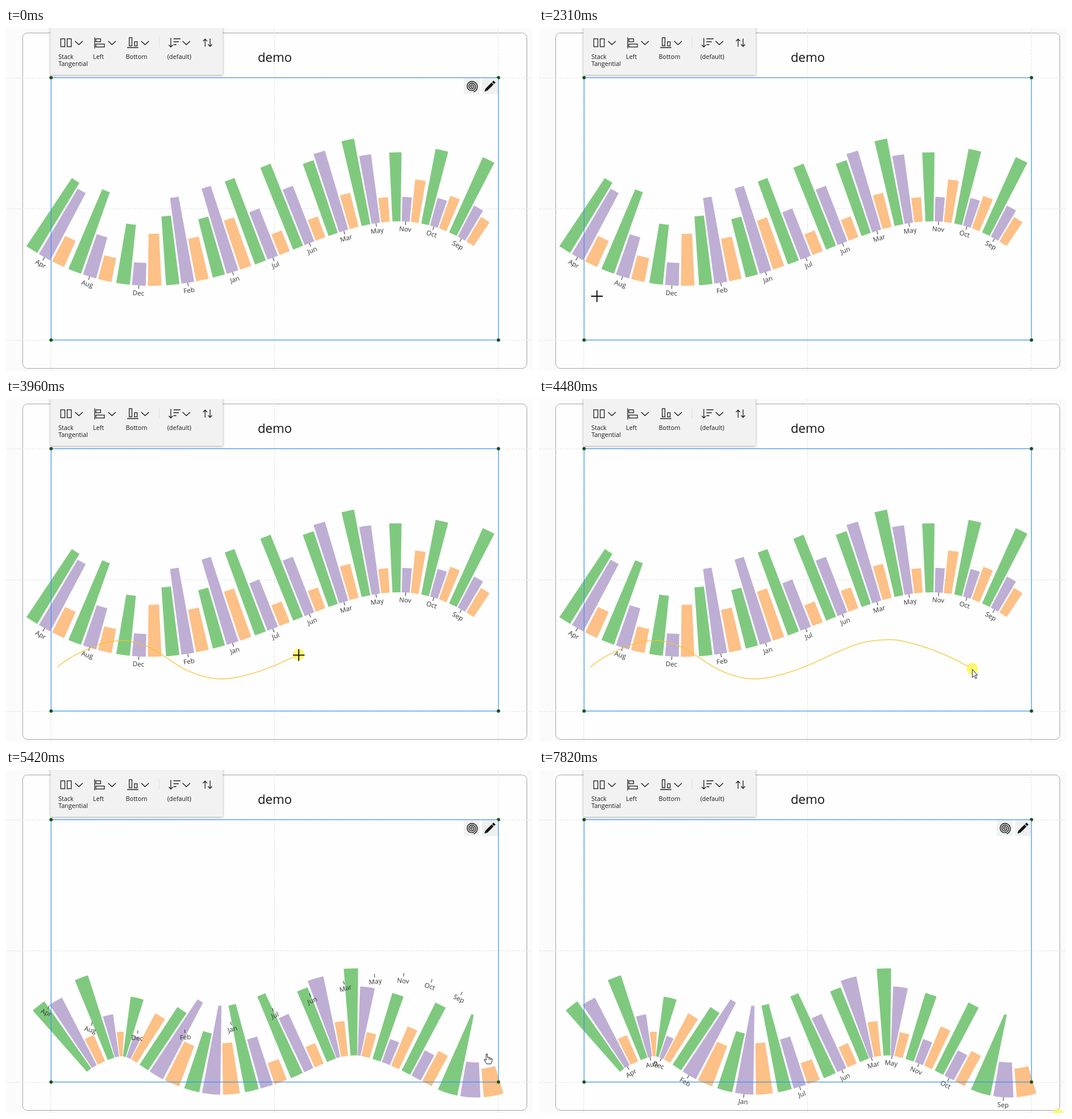
Write an HTML page with a canvas that moves like this. It is 900 px wide and 587 px high and loops after 7900 ms.

```html
<!DOCTYPE html>
<html lang="en">
<head>
<meta charset="utf-8">
<title>Curve chart demo</title>
<style>
html, body { margin: 0; width: 100%; height: 100%; overflow: hidden; background: #fbfbfb; }
canvas { display: block; }
</style>
</head>
<body>
<canvas width="900" height="587"></canvas>
<script>
const c = document.querySelector('canvas').getContext('2d');
const LOOP = 7900, HOLD = 77, DRAW = 2940, RELEASE = 5370, REDRAW = 5420;
const FONT = '"Open Sans", "Noto Sans", sans-serif';
const COLORS = ['#7fc97f', '#beaed4', '#fdc086'];
const MONTHS = {
  Apr: [140, 130, 49], Aug: [148, 73, 42], Dec: [103, 39, 89], Feb: [118, 148, 74],
  Jan: [103, 152, 88], Jul: [151, 87, 38], Jun: [151, 102, 38], Mar: [131, 141, 60],
  May: [149, 118, 42], Nov: [118, 42, 73], Oct: [130, 49, 59], Sep: [141, 60, 49] };

// Layout along a curve, as shares of its length, and the base's depth below it
const PITCH = .084, BAR_STEP = .0265, BAR_WIDTH = .023, DEPTH = 76.5, SAMPLES = 3000;

// Heading in degrees of the pen at distances along its stroke
const TURNS = [
  [0, -41.5], [40, -27], [80, -20], [118, -2.7], [142, 13.2], [184, 31.6], [209, 34.3],
  [222, 33.5], [285, 12], [318, -5.8], [342, -13.8], [363, -16.7], [420, -25.5],
  [484, -22], [506, -11.5], [550, 0], [574, 13], [675, 27.7], [726, 28.5], [793, -17]];
const PEN_X = [[DRAW, 88], [3400, 273], [3710, 397], [4480, 740], [5290, 823]];

// Free pointer moves: start, end, from, to
const MOVES = [
  [70, 690, [861, 538], [827, 98]],
  [1310, 2080, [828, 98], [104, 458]],
  [2160, 2310, [122, 457], [99, 459]],
  [2540, 2770, [97, 460], [88, 460]],
  [RELEASE, RELEASE + 1, [822, 486], [822, 486]],
  [6440, 6670, [790, 420], [563, 8]],
  [7130, 7360, [834, 95], [864, 547]],
  [7820, 7821, [886, 591], [886, 591]]];

const within = (t, a, b) => t >= a && t < b;
const clamp = p => Math.max(0, Math.min(1, p));
const mix = (a, b, p) => a + (b - a) * p;
const smooth = p => { p = clamp(p); return p * p * (3 - 2 * p); };
const held = t => Math.floor((t + 8) / HOLD) * HOLD;
const rad = d => d * Math.PI / 180;

function along(keys, v) {
  const i = Math.max(1, keys.findIndex(k => k[0] >= v) >>> 0);
  const j = Math.min(i, keys.length - 1);
  const [a, b] = [keys[j - 1], keys[j]];
  return mix(a[1], b[1], clamp((v - a[0]) / (b[0] - a[0])));
}

function measure(points) {
  let s = 0;
  return points.map(([x, y], i) => {
    if (i) s += Math.hypot(x - points[i - 1][0], y - points[i - 1][1]);
    return { x, y, s };
  });
}

// Bezier through (-1,0) (-.25,-.5) (.25,.5) (1,0), scaled to the plot
function waveCurve() {
  return measure(Array.from({ length: SAMPLES }, (_, i) => {
    const t = i / (SAMPLES - 1), r = 1 - t;
    const x = t ** 3 - r ** 3 + .75 * t * r * (t - r);
    return [459 + 382 * x, 309.5 + 382 * 1.5 * t * r * (r - t)];
  }));
}

function penCurve() {
  const step = 793 / SAMPLES;
  let x = 87.3, y = 459.5;
  return measure(Array.from({ length: SAMPLES }, (_, i) => {
    const a = rad(along(TURNS, i * step));
    return [x += step * Math.cos(a), y += step * Math.sin(a)];
  }));
}

// Place on the curve at share u, with the direction there
function spot(curve, u) {
  const s = clamp(u) * curve.at(-1).s;
  const i = Math.max(1, curve.findIndex(q => q.s >= s));
  const a = curve[i - 1], b = curve[i];
  return { x: b.x, y: b.y, angle: Math.atan2(b.y - a.y, b.x - a.x) };
}

function raise({ x, y, angle }, h) {
  return [x + Math.sin(angle) * (h - DEPTH), y - Math.cos(angle) * (h - DEPTH)];
}

function layout(curve) {
  const bars = [], marks = [];
  Object.values(MONTHS).forEach((heights, m) => {
    heights.forEach((h, k) => {
      const edge = Array.from({ length: 7 }, (_, j) =>
        spot(curve, m * PITCH + k * BAR_STEP + j / 6 * BAR_WIDTH));
      bars.push({
        color: COLORS[k],
        points: [...edge.map(e => raise(e, 0)), ...edge.reverse().map(e => raise(e, h))]
      });
    });
    const mid = spot(curve, m * PITCH + BAR_STEP + BAR_WIDTH / 2);
    marks.push([...raise(mid, 0), mid.angle]);
  });
  return { bars, marks };
}

const PEN = penCurve();
const BEFORE = layout(waveCurve()), AFTER = layout(PEN);

function pointer(t) {
  if (within(t, DRAW, RELEASE)) {
    const x = along(PEN_X, DRAW + held(t - DRAW));
    return [x, PEN.find(q => q.x >= x).y + 1];
  }
  const move = MOVES.filter(m => m[0] <= t).pop();
  if (!move) return [0, 0];
  const [start, end, from, to] = move;
  const p = smooth(held(t - start) / (end - start));
  return from.map((v, i) => mix(v, to[i], p));
}

function stroke(color, width, ...lines) {
  c.strokeStyle = color;
  c.lineWidth = width;
  c.beginPath();
  for (const line of lines)
    line.forEach(([x, y], i) => i ? c.lineTo(x, y) : c.moveTo(x, y));
  c.stroke();
}

function shape(points, fill, line) {
  c.beginPath();
  points.forEach(([x, y]) => c.lineTo(x, y));
  c.closePath();
  c.fillStyle = fill;
  c.fill();
  if (line) { c.strokeStyle = line; c.lineWidth = 1; c.stroke(); }
}

function disc(x, y, r, color) {
  c.fillStyle = color;
  c.beginPath();
  c.arc(x, y, r, 0, 7);
  c.fill();
}

function write(text, x, y, size, align = 'left', color = '#1a1a1a') {
  c.font = `${size}px ${FONT}`;
  c.textAlign = align;
  c.fillStyle = color;
  c.fillText(text, x, y);
}

function placed(x, y, angle, draw) {
  c.save();
  c.translate(x, y);
  c.rotate(angle);
  draw();
  c.restore();
}

function card(hover) {
  c.fillStyle = '#fbfbfb';
  c.fillRect(0, 0, 900, 587);
  c.beginPath();
  if (hover) c.roundRect(29, 9, 860, 573, 3);
  else c.roundRect(28.5, 8.5, 861, 574, 8);
  c.fillStyle = '#fefefe';
  c.fill();
  c.strokeStyle = hover ? '#3b8fe0' : '#a6a6a6';
  c.lineWidth = hover ? 2 : 1;
  c.stroke();
  c.setLineDash([2, 2]);
  stroke('#dcdcdc', 1,
    ...[85, 309, 534].map(y => [[0, y + .5], [900, y + .5]]),
    ...[77, 459, 841].map(x => [[x - .5, 0], [x - .5, 587]]));
  c.setLineDash([]);
  write('demo', 459, 57.5, 21.5, 'center', '#111');
}

function labels(p) {
  Object.keys(MONTHS).forEach((name, i) => {
    const [x, y, angle] = BEFORE.marks[i].map((v, j) => mix(v, AFTER.marks[i][j], p));
    placed(x, y, angle, () => {
      stroke('#333', 1, [[0, 0], [0, 6]]);
      write(name, 0, 17, 11.3, 'center', '#333');
    });
  });
}

function selection() {
  c.strokeStyle = '#2f8cf0';
  c.lineWidth = 1.1;
  c.strokeRect(77, 85, 764, 449);
  for (const x of [77, 841]) for (const y of [85, 534]) {
    disc(x, y, 3, '#3f7f4a');
    disc(x, y, 2.3, '#1f4a10');
  }
}

function toolbar() {
  c.save();
  c.shadowColor = 'rgba(0,0,0,.35)';
  c.shadowBlur = 4;
  c.shadowOffsetY = 1;
  c.fillStyle = '#f2f2f2';
  c.fillRect(76, -5, 294, 85);
  c.restore();
  for (const x of [124.5, 181, 237.5, 308])
    stroke('#222', 1.4, [[x - 6.5, 22.5], [x, 28.5], [x + 6.5, 22.5]]);
  c.lineWidth = 1.3;
  for (const r of [[93.5, 18.5, 7, 13.5], [104.5, 18.5, 7, 13.5], [153.5, 18.5, 8, 5],
    [153.5, 27.5, 14.5, 5], [210.5, 16.5, 4.5, 14], [219.5, 23.5, 4.5, 7]]) c.strokeRect(...r);
  stroke('#222', 1.3,
    [[151.5, 16], [151.5, 35]], [[207, 33.5], [226, 33.5]],
    [[281.5, 17], [281.5, 32.5]], [[278, 29], [281.5, 32.5], [285, 29]],
    [[286, 18.5], [298, 18.5]], [[286, 23.5], [295, 23.5]], [[286, 28.5], [291, 28.5]],
    [[340, 32], [340, 19]], [[336.5, 22.5], [340, 19], [343.5, 22.5]],
    [[348.5, 18], [348.5, 31.5]], [[345, 28], [348.5, 31.5], [352, 28]]);
  stroke('#dedede', 1, [[261.5, 15], [261.5, 33]]);
  write('Stack', 89.5, 53, 10.5);
  write('Tangential', 89.5, 64.5, 10.5);
  write('Left', 148.5, 53, 10.5);
  write('Bottom', 204.5, 53, 10.5);
  write('(default)', 275.5, 53, 10.5);
}

function buttons() {
  c.fillStyle = '#f0f0f0';
  c.fillRect(782, 86, 27, 27);
  c.fillRect(813, 86, 27, 27);
  const spiral = Array.from({ length: 90 }, (_, i) => {
    const a = i / 89 * 6.4 * Math.PI, r = .5 + a * .47;
    return [795.5 + r * Math.cos(a), 100 + r * Math.sin(a)];
  });
  stroke('#111', 1.4, spiral);
  placed(826, 100, rad(-45), () => {
    c.fillStyle = '#111';
    c.fillRect(-8, -2.4, 15, 4.8);
    c.fillRect(8.3, -2.4, 3.4, 4.8);
    shape([[-8, -2.4], [-12.5, 0], [-8, 2.4]], '#111');
  });
}

const CURSORS = {
  arrow: () => shape([[0, 0], [0, 14], [3, 11], [5.5, 16], [7.5, 15], [5.2, 10], [9, 10]], '#fff', '#222'),
  cross: () => stroke('#111', 1.8, [[-10, 0], [10, 0]], [[0, -10], [0, 10]]),
  hand: () => {
    shape([[-2, 0], [0, 0], [.5, 6], [3, 6], [5, 7], [8, 8], [8, 13], [6, 17], [-1, 17],
      [-5, 11], [-5, 9], [-2, 11]], '#fff', '#222');
    stroke('#222', 1, [[3, 7], [3, 10]], [[5.5, 8], [5.5, 10]]);
  },
  resize: () => shape([[0, -8], [4, -4], [1, -4], [1, 4], [4, 4], [0, 8], [-4, 4], [-1, 4],
    [-1, -4], [-4, -4]], '#fff', '#222')
};

function cursorKind(t) {
  if (t < 70 || within(t, 6750, 7130) || t >= 7437) return null;
  if (within(t, 840, 1080) || within(t, RELEASE, 6440)) return 'hand';
  if (within(t, 4480, 4580)) return 'arrow';
  if (within(t, 1080, RELEASE)) return 'cross';
  return within(t, 6670, 6750) ? 'resize' : 'arrow';
}

function draw(t) {
  card(within(t, 6670, 6750));
  for (const bar of (t < REDRAW ? BEFORE : AFTER).bars) shape(bar.points, bar.color);
  labels(t < REDRAW ? 0 : smooth((t - 5375) / 240));
  selection();
  toolbar();
  if (!within(t, 1080, RELEASE)) buttons();

  const [x, y] = pointer(t);
  if (within(t, DRAW, RELEASE))
    stroke('#f6c02c', 1.2, PEN.filter(q => q.x <= x).map(q => [q.x, q.y]));
  if (within(t, 1010, 1080) || within(t, 2770, RELEASE) || t >= 7820)
    disc(x, y - 1, 10, 'rgba(255,246,60,.72)');
  const kind = cursorKind(t);
  if (kind) placed(x, y, 0, CURSORS[kind]);
}

function tick(now) {
  draw(now % LOOP);
  requestAnimationFrame(tick);
}
requestAnimationFrame(tick);
</script>
</body>
</html>
```
